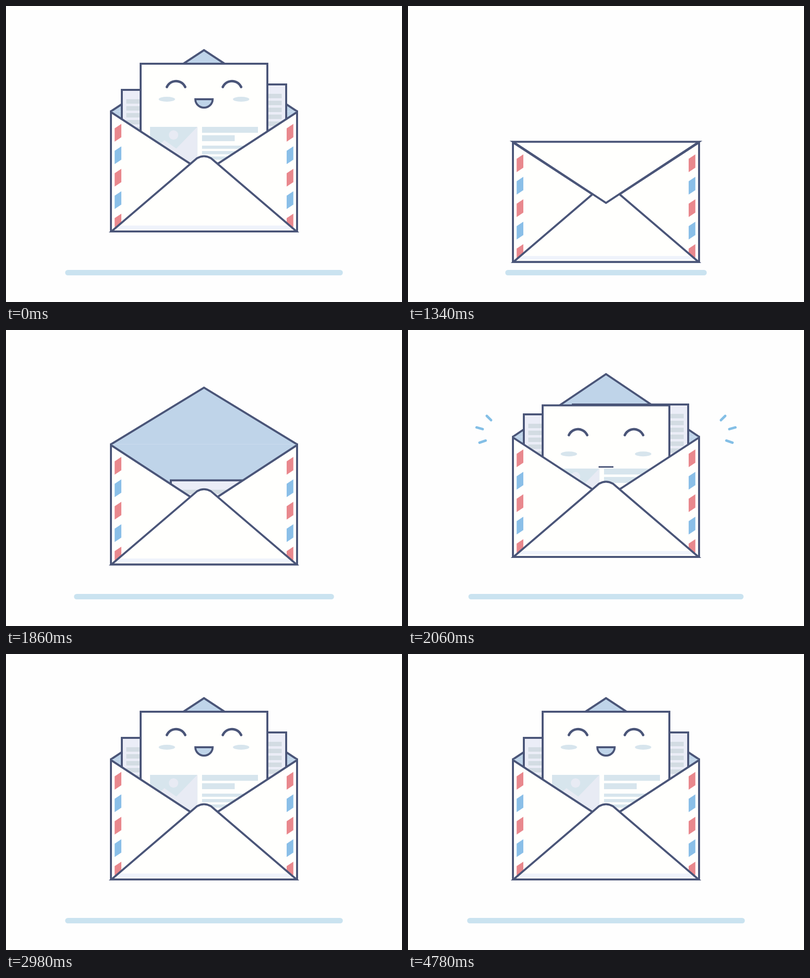
An HTML page with a canvas that plays this animation: 800x600 px, repeating every 4.8 s.

```html
<!DOCTYPE html>
<html lang="en">
<head>
<meta charset="utf-8">
<title>Happy letter</title>
<style>
html, body { margin: 0; width: 100%; height: 100%; overflow: hidden; background: #fefefe; }
canvas { display: block; }
</style>
</head>
<body>
<canvas id="stage" width="800" height="600"></canvas>
<script>
const ctx = document.getElementById('stage').getContext('2d');
const LOOP = 4800;
const INK = '#4a5578', PAPER = '#fffffd', INSIDE = '#bfd4e9', SHEET = '#ebedf7',
      SHEET_LINE = '#d3dce3', PALE = '#d7e5ed', HILL = '#e8ebf4',
      RED = '#e9888d', BLUE = '#8abfe8', SPARK = '#84bfe6', GROUND = '#cae3f0';

const span = (t, from, to) => Math.min(1, Math.max(0, (t - from) / (to - from)));
const sine = p => (1 - Math.cos(Math.PI * p)) / 2;
const cubic = p => p < .5 ? 4 * p ** 3 : 1 - 4 * (1 - p) ** 3;
const backOut = p => 1 + 2.70158 * (p - 1) ** 3 + 1.70158 * (p - 1) ** 2;

function poly(points, fill, stroke, closed = true) {
  ctx.beginPath();
  points.forEach(([x, y]) => ctx.lineTo(x, y));
  if (closed) ctx.closePath();
  paint(fill, stroke);
}

function paint(fill, stroke, width = 4) {
  if (fill) { ctx.fillStyle = fill; ctx.fill(); }
  if (stroke) { ctx.strokeStyle = stroke; ctx.lineWidth = width; ctx.stroke(); }
}

function bar(x, y, w, h, fill) {
  ctx.fillStyle = fill;
  ctx.fillRect(x, y, w, h);
}

function ellipse(x, y, rx, ry, fill) {
  ctx.beginPath();
  ctx.ellipse(x, y, rx, ry, 0, 0, 7);
  paint(fill);
}

// Distance a part still sits below its resting place.
function sunk(t, travel, riseStart) {
  if (t < 1300) return travel * sine(span(t, 1000, 1190));
  return travel * (1 - backOut(span(t, riseStart, riseStart + 500)));
}

function ground(drop) {
  const half = 275 - .8625 * drop - .00625 * drop * drop;
  ctx.lineCap = 'round';
  ctx.beginPath();
  ctx.moveTo(400 - half, 540.5);
  ctx.lineTo(400 + half, 540.5);
  paint(null, GROUND, 11);
  ctx.lineCap = 'butt';
}

function flap(scale) {
  const shape = [[212, 213.5], [400, 213.5 + 124 * scale], [588, 213.5]];
  if (scale > 0) poly(shape, PAPER, INK);
  else poly(shape, INSIDE, INK, false);
}

function sheet(x, y) {
  ctx.beginPath();
  ctx.rect(x, y, 233, 300);
  paint(SHEET, INK);
  for (let i = 0; i < 12; i++) bar(x + 9, y + 19 + 14 * i, 215, 9, SHEET_LINE);
}

function letter(y) {
  ctx.beginPath();
  ctx.rect(272, y, 256, 360);
  paint(PAPER, INK);
  ctx.save();
  ctx.translate(0, y - 117);
  bar(291, 245, 95.5, 72, PALE);
  poly([[386.5, 245], [344, 289], [320, 272], [300, 290], [300, 317], [386.5, 317]], HILL);
  ellipse(338.5, 261.5, 9.5, 9.5, HILL);
  bar(396, 245, 113, 12, PALE);
  bar(396, 262, 66, 12, PALE);
  for (let i = 0; i < 5; i++) bar(396, 283 + 11 * i, 113, 6.5, PALE);
  ctx.restore();
}

function face(t) {
  const eyeY = 172.5 + sunk(t, 205, 1946);
  const cheekY = 189 + sunk(t, 205, 1960);
  const mouthY = 189 + sunk(t, 205, 1984);
  ctx.lineCap = 'round';
  for (const x of [343.5, 456.5]) {
    ctx.beginPath();
    ctx.arc(x, eyeY, 20.3, -Math.PI / 2 - 1.147, -Math.PI / 2 + 1.147);
    paint(null, INK, 5);
  }
  ctx.lineCap = 'butt';
  for (const x of [325, 475]) ellipse(x, cheekY, 16.5, 5, PALE);

  const open = t < 1300 ? 1 : sine(span(t, 2060, 2340));
  const half = 14 + 3.5 * open;
  ctx.beginPath();
  ctx.ellipse(400, mouthY, half, 17 * open, 0, 0, Math.PI);
  ctx.closePath();
  if (open < .02) {
    ctx.beginPath();
    ctx.moveTo(385, mouthY);
    ctx.lineTo(415, mouthY);
  }
  paint(INSIDE, INK, 3 + open);
}

function stripes(x) {
  for (let i = 0; i < 5; i++) {
    const y = 239 + 45.5 * i;
    poly([[x, y + 9], [x + 13.5, y], [x + 13.5, y + 27], [x, y + 36]], i % 2 ? BLUE : RED);
  }
}

function pocket() {
  const opening = [[212, 215], [400, 338], [588, 215]];
  poly([...opening, [588, 457], [212, 457]], PAPER);
  stripes(219.5);
  stripes(567);
  poly([...opening, [588, 457], [212, 457]], null, INK);

  ctx.beginPath();
  ctx.moveTo(213, 457);
  ctx.lineTo(386, 308.5);
  ctx.quadraticCurveTo(400, 300.5, 414, 308.5);
  ctx.lineTo(587, 457);
  paint(PAPER);
  poly([[229, 445], [571, 445], [579, 452], [221, 452]], '#eff3fb');
  ctx.beginPath();
  ctx.moveTo(213, 457);
  ctx.lineTo(386, 308.5);
  ctx.quadraticCurveTo(400, 300.5, 414, 308.5);
  ctx.lineTo(587, 457);
  ctx.closePath();
  paint(null, INK);
}

function sparks(t) {
  const head = 1.4 * sine(span(t, 1970, 2125));
  const tail = 1.4 * sine(span(t, 2050, 2220));
  if (head - tail < .01) return;
  ctx.lineCap = 'round';
  for (const [x, y, dx, dy] of [[168, 183, -10, -10], [151, 201, -14, -4], [157, 224, -14, 5]])
    for (const side of [-1, 1]) {
      const px = k => 400 + side * (400 - x - dx * k);
      ctx.beginPath();
      ctx.moveTo(px(tail), y + dy * tail);
      ctx.lineTo(px(head), y + dy * head);
      paint(null, SPARK, 5);
    }
  ctx.lineCap = 'butt';
}

function draw(t) {
  const drop = 62 * (sine(span(t, 1000, 1300)) - sine(span(t, 1300, 2184)));
  const closing = sine(span(t, 1100, 1320));
  const opening = cubic(span(t, 1505, 1955));
  const flapScale = -1 + 2 * (closing - opening) - .03 * Math.sin(Math.PI * span(t, 1955, 2300));

  bar(0, 0, 800, 600, '#fefefe');
  ground(drop);
  ctx.save();
  ctx.translate(0, drop);
  if (flapScale <= 0) flap(flapScale);
  poly([[212, 213.5], [588, 213.5], [400, 338]], INSIDE);

  ctx.save();
  ctx.beginPath();
  ctx.rect(0, -100, 800, 555);
  ctx.clip();
  sheet(234, 170 + sunk(t, 155, 1870));
  sheet(333, 159 + sunk(t, 165, 1835));
  letter(117 + sunk(t, 207, 1930));
  face(t);
  ctx.restore();

  pocket();
  if (flapScale > 0) flap(flapScale);
  ctx.restore();
  sparks(t);
}

const start = performance.now();
function tick() {
  draw((performance.now() - start) % LOOP);
  requestAnimationFrame(tick);
}
tick();
</script>
</body>
</html>
```
